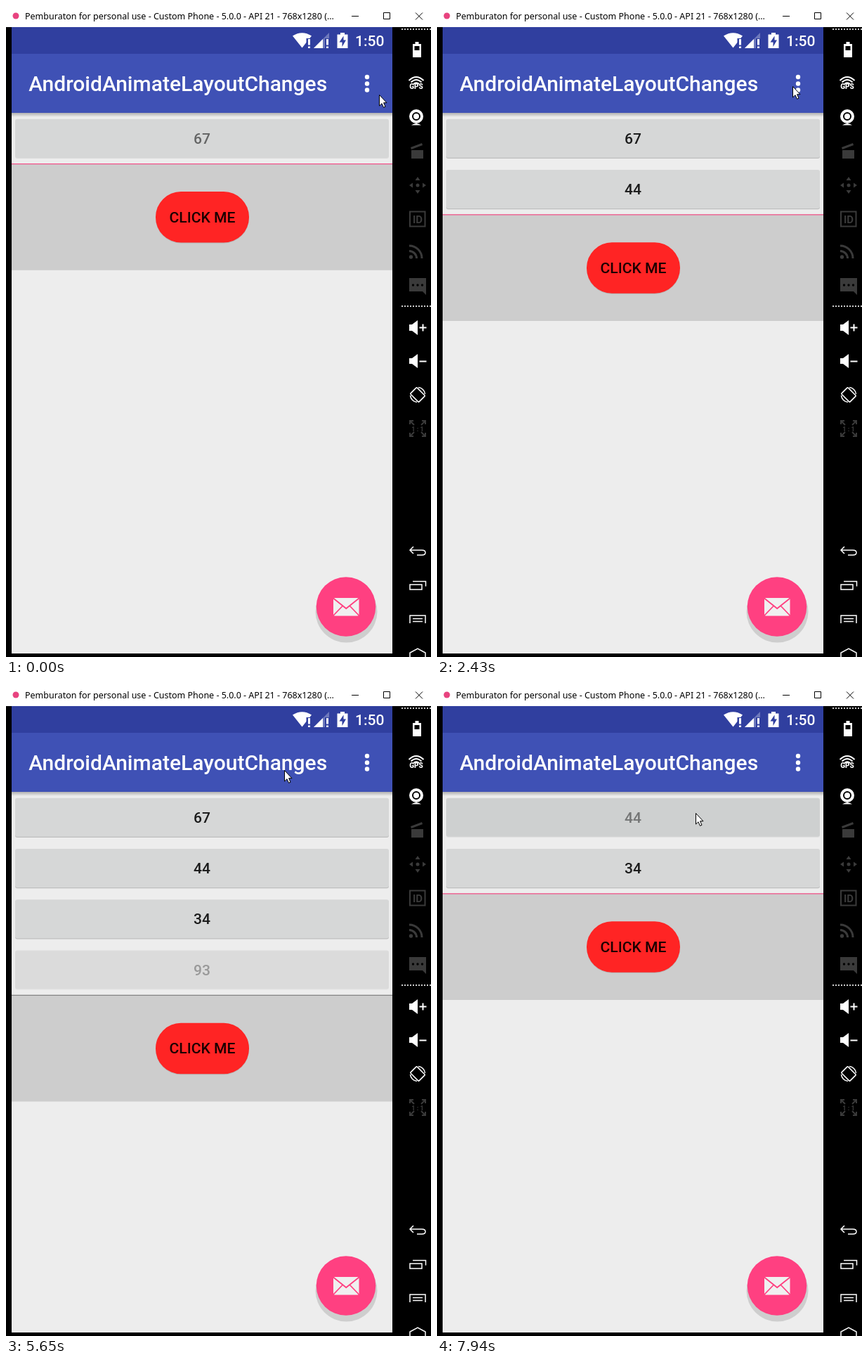
Write an HTML page that moves like this. It is 605 px wide and 926 px high and loops after 8000 ms.

```html
<!DOCTYPE html>
<html lang="en">
<head>
<meta charset="utf-8">
<title>Animated layout changes</title>
<style>
  html, body { margin: 0; width: 100%; height: 100%; overflow: hidden; background: #000; }
  svg { display: block; width: 605px; height: 926px; font-family: Roboto, sans-serif; }
  .medium { font-weight: 500; font-size: 21.1px; }
  .mid { text-anchor: middle; }
  .line { fill: none; stroke: #fff; stroke-width: 1.5; }
  .thick { stroke-width: 2; }
  .dim { fill: #3a3a3a; }
  .dimline { fill: none; stroke: #3a3a3a; stroke-width: 2; }
  #popup { filter: drop-shadow(0 1px 2px rgba(0,0,0,.18)) drop-shadow(0 8px 7px rgba(0,0,0,.18)); }
</style>
</head>
<body>
<svg viewBox="0 0 605 926">
  <defs>
    <clipPath id="screen"><path d="M8 30H550V921H8z"/></clipPath>
    <clipPath id="listClip"><rect id="listArea" x="8" y="152" width="542"/></clipPath>
    <linearGradient id="shade" x2="0" y2="1">
      <stop stop-opacity=".26"/><stop offset="1" stop-opacity="0"/>
    </linearGradient>
  </defs>

  <!-- window bar -->
  <path fill="#fff" d="M0 0H605V30H0z"/>
  <circle cx="14" cy="14" r="4.5" fill="#e8437f"/>
  <text x="27" y="19" font-family="Noto Sans, Open Sans, sans-serif" font-size="12.5">Pemburaton for personal use - Custom Phone - 5.0.0 - API 21 - 768x1280 (...</text>
  <path fill="none" stroke="#000" d="M492 14.500h10M537.500 9.500h9v9h-9zM583 9.500l10 10M593 9.500l-10 10"/>

  <g clip-path="url(#screen)">
    <path fill="#ededed" d="M8 30H550V921H8z"/>
    <g id="list" clip-path="url(#listClip)"></g>

    <g id="panel">
      <path fill="#cdcdcd" d="M8 0H550V151.700H8z"/>
      <path id="rule" d="M8 0H550V1.100H8z"/>
      <rect x="213" y="41" width="133" height="72.500" rx="36" fill="#000" opacity=".12"/>
      <rect x="213" y="40" width="133" height="72.500" rx="36" fill="#ff2424"/>
      <text class="medium mid" x="279.500" y="83.500" fill="#1c0000">CLICK ME</text>
    </g>

    <path fill="url(#shade)" d="M8 152H550V158H8z"/>
    <path fill="#3f51b5" d="M8 67H550V152H8z"/>
    <path fill="#303f9f" d="M8 30H550V68H8z"/>
    <text x="32.300" y="120.700" font-size="30" font-weight="500" fill="#fff">AndroidAnimateLayoutChanges</text>
    <g fill="#fff">
      <circle cx="514" cy="101" r="3.200"/><circle cx="514" cy="110.500" r="3.200"/><circle cx="514" cy="119.500" r="3.200"/>
      <path d="M408 42.500Q421.500 34 435 42.500L421.500 59.500z"/>
      <path fill="#303f9f" d="M427.500 46H436V61H427.500z"/>
      <path d="M430 47h3v8.500h-3zM430 57.500h3v2.500h-3z"/>
      <path opacity=".3" d="M438 60L460 38V60z"/>
      <path d="M438 60L451 47V60z"/>
      <path fill="#303f9f" d="M454 46h7v15h-7z"/>
      <path d="M456 47h3v8.500h-3zM456 57.500h3v2.500h-3z"/>
      <path d="M476 38h6v2.500h4.500V60h-15V40.500h4.500z"/>
      <path fill="#303f9f" d="M480.500 42.500L474.500 51.500H478.500V58L484 48.500H480.500z"/>
      <text class="medium" x="497" y="57">1:50</text>
    </g>

    <circle cx="484.500" cy="861.500" r="44" fill="#000" opacity=".13"/>
    <circle cx="484" cy="854.500" r="42.300" fill="#ff4081"/>
    <rect x="466" y="842" width="36.500" height="25.500" rx="2" fill="#f0f0f0"/>
    <path fill="none" stroke="#ff4081" stroke-width="1.800" d="M466 842.500L484.200 857 502.500 842.500M466 867L479 853.500M502.500 867L489.500 853.500"/>

    <g id="popup" font-size="24" fill="#1f1f1f">
      <rect x="221" y="74" width="323.500" height="144" rx="3" fill="#fafafa"/>
      <text x="245.500" y="118.500">ADD_Default_layout_anim</text>
      <text x="245.500" y="190.700">ADD1_Custom_anim</text>
    </g>
  </g>

  <!-- emulator side bar -->
  <path stroke="#ccc" stroke-width="1.800" stroke-dasharray="2 2" d="M563 33H605M563 427H605"/>
  <g fill="#fff">
    <path d="M582.500 51h5v3h3.500v19h-12V54h3.500z"/>
    <path fill="#000" d="M581.500 57h7v6h-7z"/>
    <text class="mid" x="584" y="118" font-size="10" font-weight="900">GPS</text>
    <circle cx="584" cy="157" r="10"/>
    <path d="M577 169.500q7-5 14 0z"/>
    <circle cx="584" cy="157" r="5" fill="none" stroke="#000" stroke-width="2"/>
    <path d="M574 453h4l8-6v21l-8-6h-4zM574 501h4l8-6v20l-8-6h-4z"/>
  </g>
  <path class="line thick" d="M573.500 106q10.500-10 21 0M576.500 108.500q7.500-7 15 0M580 111q4-3.500 8 0"/>
  <path class="line thick" d="M588.500 457.500h10M593.500 452.500v10M588.500 505.500h10"/>
  <g class="dim">
    <path d="M577 205h17v12h-17zM576 201l16-6 1 3-16 6z"/>
    <path d="M586 243l3.500 5h-7zM586 267l3.500-5h-7zM574 255l5-3.500v7zM598 255l-5-3.500v7z"/>
    <circle cx="586" cy="255" r="2.500"/>
    <text class="mid" x="586" y="308.500" font-size="15" font-weight="700">ID</text>
    <circle cx="576.500" cy="357" r="2.700"/>
    <path d="M574 387h24v24l-5-5h-19z"/>
    <text class="mid" x="586" y="605" font-size="9" font-weight="700">1 : 1</text>
  </g>
  <path class="dimline" d="M575 292.500h21.500v21H575z"/>
  <path class="dimline" style="stroke-width:3" d="M574 348.500a10.500 10.500 0 0 1 10.500 10.500M574 341a18 18 0 0 1 18 18"/>
  <path class="dimline" d="M580 590h-5v5M575 590l6 6M592 590h5v5M597 590l-6 6M580 612h-5v-5M575 612l6-6M592 612h5v-5M597 612l-6-6"/>
  <path stroke="#000" stroke-width="3.400" stroke-linecap="round" d="M579.500 397h0M586 397h0M592.500 397h0"/>
  <rect class="line" x="579.500" y="544.500" width="13" height="17" rx="1" transform="rotate(-45 586 553)"/>
  <path class="line" d="M587 542.500a10.500 10.500 0 0 1 9.500 9.500M585 563.500a10.500 10.500 0 0 1-9.500-9.500"/>
  <path class="line" d="M580 769l-5 5 5 5M575 774h17q5 0 5 3.500t-5 3.500h-7M575 823h17v7h-17zM579 818.500h18.500v7M575 878v-11h22v11M579 871.500h14M579 875.500h14M575 927v-7l11-6 11 6v7"/>

  <path id="cursor" fill="#fff" stroke="#000" d="M.5.5V16L4 12.700 6.500 18.300 9 17.200 6.600 11.700H11z"/>
</svg>

<script>
const LOOP = 8000, ROW = 72.25, FADE = 300, HOP = 320;
const $ = id => document.getElementById(id);

// menu opens and closes, row space grows, row fades out, row space shrinks
const items = [
  { label: "67", grow: -470, fade: 6710, shrink: 6890 },
  { label: "44", open: 570, close: 1420, grow: 1400, fade: 7790, shrink: 7800 },
  { label: "34", open: 2480, close: 3180, grow: 3400 },
  { label: "93", open: 4350, close: 5080, grow: 5260 },
];

// pointer stops: departure time, x, y
const stops = [[-HOP, 531, 126], [210, 529, 116], [840, 460, 124], [1700, 506, 114], [2650, 461, 110],
  [3750, 506, 114], [4440, 393, 115], [5330, 396, 121], [5670, 453, 290], [5990, 337, 221],
  [6310, 322, 199], [6850, 360, 195], [7170, 368, 182]];

const clamp = v => Math.max(0, Math.min(1, v));
const ramp = (t, start, span = FADE) => clamp((t - start) / span) || 0;
const ease = v => (1 - Math.cos(Math.PI * v)) / 2;
const move = (id, x, y) => $(id).setAttribute("transform", `translate(${x} ${y})`);

$("list").innerHTML = items.map(({ label }) => `<g>
  <rect x="13" y="1.200" width="532" height="55" rx="3" fill="#000" fill-opacity=".2"/>
  <rect x="13" width="532" height="55" rx="3"/>
  <text class="medium mid" x="279" y="35.200" fill="#1b1b1b">${label}</text></g>`).join("");
const rows = [...$("list").children];

function drawRow({ grow, fade }, i, t) {
  const alpha = ramp(t, grow + 290) * (1 - ramp(t, fade));
  const slide = ease(ramp(t, items[0].fade + FADE));
  const [shadow, face, text] = rows[i].children;
  rows[i].setAttribute("transform", `translate(0 ${160.7 + ROW * (i - slide)})`);
  shadow.setAttribute("opacity", alpha ** 2);
  face.setAttribute("opacity", 1 - (1 - alpha) ** 3);
  face.setAttribute("fill", t >= fade ? "#cccece" : "#d6d7d7");
  text.setAttribute("opacity", alpha);
}

function draw(t) {
  const count = items.filter(({ grow, shrink = LOOP }) => t >= grow && t < shrink).length;
  const top = 224.1 + ROW * (count - 1);
  move("panel", 0, top);
  $("rule").setAttribute("fill", count == 4 ? "#858585" : "#f4528a");
  $("listArea").setAttribute("height", top - 152);
  items.forEach((item, i) => drawRow(item, i, t));

  const shown = items.map(({ open, close }) => ramp(t, open, 200) * (1 - ramp(t, close, 265)));
  $("popup").setAttribute("opacity", Math.max(...shown));

  const n = stops.findLastIndex(stop => stop[0] <= t);
  const [start, x, y] = stops[n], [, px, py] = stops[Math.max(0, n - 1)];
  const k = ease(ramp(t, start, HOP));
  move("cursor", px + (x - px) * k, py + (y - py) * k);
}

function loop() {
  draw(performance.now() % LOOP);
  requestAnimationFrame(loop);
}
loop();
</script>
</body>
</html>
```
